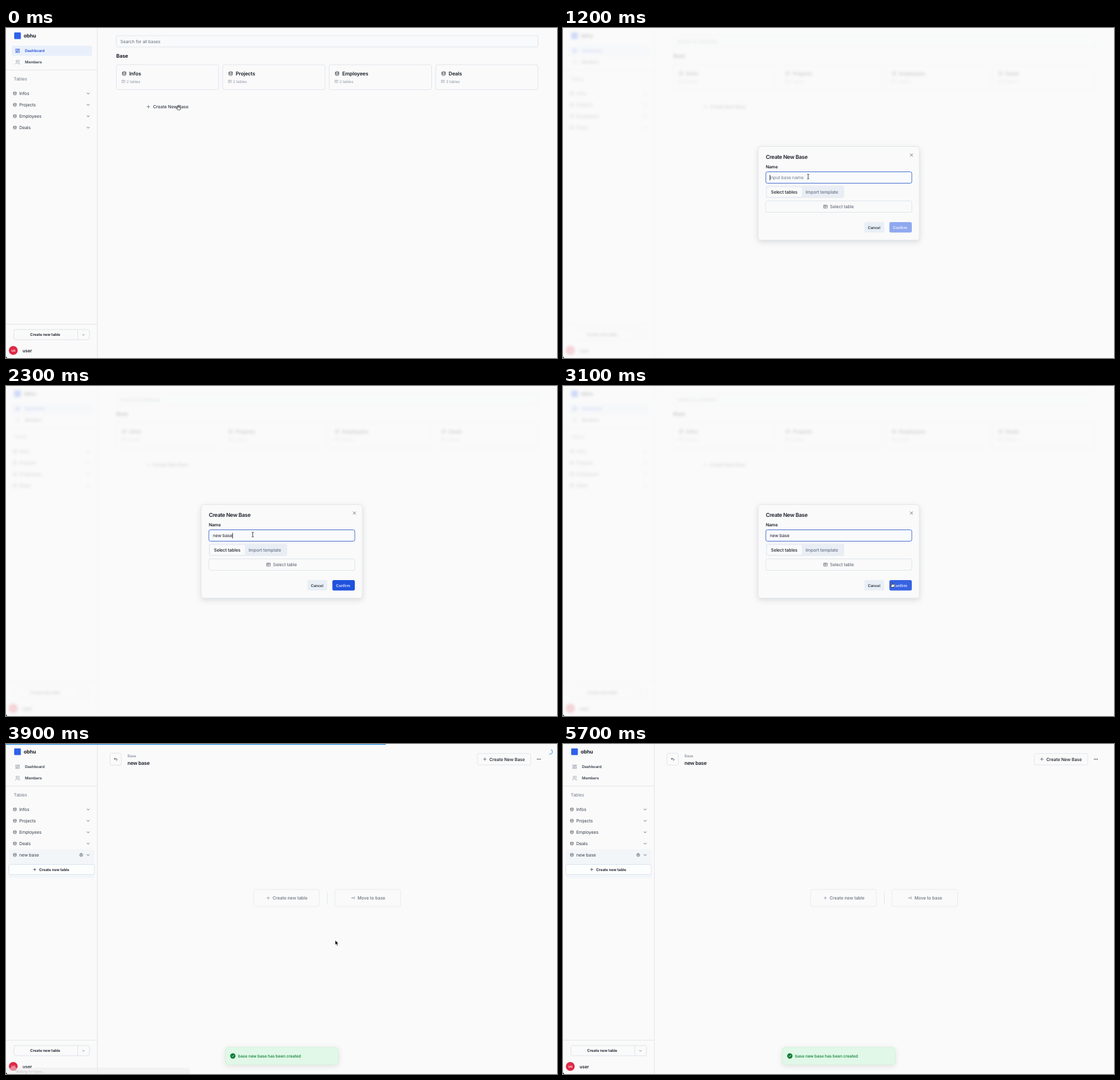
An HTML page that plays this animation: 872 by 522 pixels, repeating every 5.9 s.

```html
<!DOCTYPE html>
<html lang="en">
<head>
<meta charset="utf-8">
<title>Create a base</title>
<style>
  html, body { margin: 0; width: 100%; height: 100%; overflow: hidden; background: #fafafa; }
  svg { display: block; width: 872px; height: 522px; }
  text {
    font-family: Inter, "Open Sans", sans-serif;
    letter-spacing: -.015em;
    text-rendering: geometricPrecision;
    white-space: pre;
  }
  .tight { letter-spacing: -.035em; }
  #dialog { transform-origin: 436.5px 261.5px; }
  #panel { filter: drop-shadow(0 3px 4px rgba(15, 23, 42, .13)); }
  #toastBox { filter: drop-shadow(0 2px 4px rgba(0, 0, 0, .11)); }
</style>
</head>
<body>
<svg id="stage" viewBox="0 0 872 522"></svg>
<script>
const LOOP = 5900, STEP = 100;
const INK = '#1b1f2a', SOFT = '#353d4b', MUTED = '#727b8a', PALE = '#8f97a5';
const LINE = '#e1e6ed', BG = '#fafafa', BLUE = '#2450d8', GREEN = '#0a7d33';

const ICONS = {
  base: 'M4 6c0-1.7 3.6-3 8-3s8 1.3 8 3-3.6 3-8 3-8-1.3-8-3v12c0 1.7 3.6 3 8 3s8-1.3 8-3V6M4 12c0 1.7 3.6 3 8 3s8-1.3 8-3',
  down: 'm5 9 7 7 7-7',
  plus: 'M4 12h16M12 4v16',
  close: 'M19 5 5 19M5 5l14 14',
  table: 'M3 4h18v16H3zM3 10h18M10 4v16',
  dash: 'M4 4h6v8H4zM4 16h6v4H4zM14 12h6v8h-6zM14 4h6v4h-6z',
  users: 'M5 7a4 4 0 1 0 8 0 4 4 0 1 0-8 0M3 21v-2a4 4 0 0 1 4-4h4a4 4 0 0 1 4 4v2M16 3a4 4 0 0 1 0 8M21 21v-2a4 4 0 0 0-3-4',
  back: 'm9 14-4-4 4-4M5 10h11a4 4 0 1 1 0 8h-1',
  move: 'M3 12h12M11 8l4 4-4 4M20 5v14',
  ring: 'M12 3a9 9 0 1 0 0 18 9 9 0 1 0 0-18M12 8a4 4 0 1 0 0 8 4 4 0 1 0 0-8',
  check: 'm7 12 4 4 7-8'
};

// y is the middle of the capitals
const label = (x, y, str, size = 7, weight = 400, fill = INK, extra = '') =>
  `<text x="${x}" y="${y + size * .364}" font-size="${size}" font-weight="${weight}" fill="${fill}" ${extra}>${str}</text>`;
const rect = (x, y, w, h, fill = 'none', stroke = 'none', r = 3, extra = '') =>
  `<rect x="${x}" y="${y}" width="${w}" height="${h}" rx="${r}" fill="${fill}" stroke="${stroke}" ${extra}/>`;
const line = (x1, y1, x2, y2, color = '#e4e6eb') =>
  `<path d="M${x1} ${y1}L${x2} ${y2}" stroke="${color}"/>`;
const icon = (name, cx, cy, size, color = SOFT, width = 2) =>
  `<path d="${ICONS[name]}" transform="translate(${cx - size / 2} ${cy - size / 2}) scale(${size / 24})"
    fill="none" stroke="${color}" stroke-width="${width}" stroke-linecap="round" stroke-linejoin="round"/>`;
const group = (id, ...parts) => `<g id="${id}">${parts.join('')}</g>`;

const navRow = (y, name, glyph, color, tint) =>
  icon(glyph, 18.5, y, 8.4, tint) + label(30, y, name, 6, 600, color);
const sideRow = (y, name) =>
  icon('base', 14, y, 6.6, SOFT) + label(21, y, name, 7, 400, SOFT) + icon('down', 130, y, 6, INK, 2.6);
const card = (x, y, name, count) =>
  rect(x, y, 162, 39.5, BG, LINE) +
  icon('base', x + 12.5, y + 14, 8, INK) + label(x + 20.5, y + 14, name, 8, 600) +
  icon('table', x + 11.5, y + 26.5, 6, PALE, 1.8) + label(x + 16.3, y + 26.5, `${count} tables`, 6, 400, PALE);

const sidebar = group('sidebar',
  rect(13, 7, 10.5, 10.5, '#2f62ea', 'none', 1),
  label(28, 12, 'obhu', 8, 700),
  group('activeNav', rect(9, 28, 127, 16, '#e9f0fb', 'none', 2), navRow(36, 'Dashboard', 'dash', BLUE, BLUE)),
  group('idleNav', navRow(36, 'Dashboard', 'dash', SOFT, PALE)),
  navRow(54, 'Members', 'users', SOFT, PALE),
  line(0, 66.5, 144, 66.5), line(144.5, 0, 144.5, 522),
  label(12.3, 80, 'Tables', 7, 400, MUTED),
  group('openRow',
    rect(4.5, 166.5, 135.5, 45.5, '#f3f6f9', 'none', 2),
    rect(4.5, 190.5, 135.5, 16, '#fcfdfd', '#dbe4ee', 2),
    icon('plus', 45.5, 198.5, 6, INK, 2.4), label(52.5, 198.5, 'Create new table', 6, 600),
    icon('ring', 119, 175.5, 6.6, SOFT)),
  ['Infos', 'Projects', 'Employees', 'Deals'].map((n, i) => sideRow(103.5 + 18 * i, n)).join(''),
  group('newRow', sideRow(175.5, 'new base')),
  line(0, 468.5, 144, 468.5),
  rect(12.5, 477, 119.5, 16, BG, '#dfe4eb', 2.5), line(113.5, 477, 113.5, 493, '#dfe4eb'),
  label(38.3, 485, 'Create new table', 6, 600), icon('down', 122.5, 485.3, 5, INK, 2.4),
  '<circle cx="11.5" cy="510" r="7" fill="#dd2a45"/>',
  label(11.5, 510, 'us', 6, 500, '#fff', 'text-anchor="middle"'),
  label(26.3, 510, 'user', 7, 600));

const dashboard = group('dashboard',
  rect(174.5, 12, 667.5, 18, '#f8fafb', LINE, 2),
  label(181, 21, 'Search for all bases', 7, 400, '#67707e'),
  label(174.5, 44, 'Base', 8, 700),
  card(174.5, 58, 'Infos', 2), card(343, 58, 'Projects', 2),
  card(511.5, 58, 'Employees', 2), card(680, 58, 'Deals', 3),
  group('newCard',
    card(174.5, 104, 'new base', 0),
    rect(343, 104.5, 162, 40, 'none', '#e8ecf1', 3, 'stroke-dasharray="2 1"')),
  group('createLabel',
    icon('plus', 225.4, 124.5, 6.6, SOFT), label(232.8, 124.5, 'Create New Base', 7, 500, SOFT)));

const basePage = group('basePage',
  rect(164.5, 14.5, 18, 19, BG, '#e2e6ec', 2.5), icon('back', 173.5, 24, 7, INK, 2.2),
  label(192.3, 18.7, 'Base', 6, 400, MUTED),
  label(192.3, 30, 'new base', 8, 600, INK, 'class="tight"'),
  rect(746, 15, 84.5, 18, BG, '#e2e6ec', 2.5),
  icon('plus', 757.8, 24, 6.6, INK), label(765, 24, 'Create New Base', 7, 500),
  [841, 843.3, 845.6].map(x => `<circle cx="${x}" cy="24" r=".75" fill="${INK}"/>`).join(''),
  rect(392, 230, 104, 27, BG, '#e8ebf0', 3), rect(520.5, 230, 104, 27, BG, '#e8ebf0', 3),
  line(508.5, 235, 508.5, 253, '#e4e7ec'),
  icon('plus', 415, 243.5, 6.6, MUTED), label(422, 243.5, 'Create new table', 7, 500, '#6c7583'),
  icon('move', 549, 243.5, 7, MUTED), label(556.3, 243.5, 'Move to base', 7, 500, '#6c7583'));

const dialog = group('dialog',
  rect(309, 187.5, 255, 148, BG, '#e4e7ec', 4, 'id="panel"'),
  label(321, 204, 'Create New Base', 8.5, 600, INK, 'class="tight"'),
  icon('close', 551.5, 201, 7, SOFT, 2.2),
  label(321, 220, 'Name', 6.8, 600),
  rect(321, 227.5, 231, 18, '#f8fafc', '#4f74d2', 2.5),
  label(327.3, 236.7, '', 7, 400, INK, 'id="typed"'),
  rect(327, 232.5, .8, 8.5, '#111', 'none', 0, 'id="caret"'),
  rect(321, 249.5, 124, 19.5, '#e9eef5', 'none', 3), rect(323, 251.5, 55, 15.5, BG, 'none', 2),
  label(329, 259.5, 'Select tables', 7, 500), label(384, 259.5, 'Import template', 7, 500, '#6a7587'),
  rect(321, 273.5, 231, 18, BG, LINE, 2.5),
  icon('table', 415.5, 282.5, 7, SOFT, 1.8), label(422.6, 282.5, 'Select table', 7, 400, '#525b69'),
  rect(477, 307, 31.5, 16.5, '#e9eff6', 'none', 2.5), label(482.6, 315.5, 'Cancel', 6, 500),
  rect(516.5, 307, 35.5, 16.5, BLUE, 'none', 2.5, 'id="confirm"'),
  label(522.2, 315.5, 'Confirm', 6, 500, '#fff'));

const toast = group('toast',
  rect(347.5, 480, 178, 27, '#e1f8e8', '#d5f3de', 4, 'id="toastBox"'),
  `<circle cx="359" cy="493.5" r="4.2" fill="${GREEN}"/>`, icon('check', 358.9, 493.5, 7, '#fff', 2.6),
  label(367.3, 493.5, 'base new base has been created', 6.5, 500, GREEN));

const loader = group('loader',
  rect(0, 0, 0, 1.2, '#2b8fe6', 'none', 0, 'id="bar"'),
  '<path id="spinner" d="M0-3.7A3.7 3.7 0 0 1 0 3.7" fill="none" stroke="#2b8fe6"/>');

const statusBar = group('statusBar',
  rect(-3, 512, 294, 13, '#ececee', 'none', 2), label(15, 517.5, 'Waiting for base...', 5.6, 400, '#8e8e93'));

const pointer = group('pointer',
  '<path id="arrow" d="M0 0v7.4l1.7-1.6 1.3 2.9 1.3-.6-1.3-2.8h2.4z" fill="#000" stroke="#fff" stroke-width=".6"/>',
  '<path id="hand" transform="translate(-3.8 -4.2) scale(.36)" fill="#fff" stroke="#111" stroke-width="2" d="M22 14a8 8 0 0 1-8 8h-2.6c-2 0-3.5-.8-4.8-2.2L3 16a2 2 0 0 1 3-3l2 2V4a2 2 0 0 1 4 0v6a2 2 0 0 1 3 0 2 2 0 0 1 3.5 1 2 2 0 0 1 3.5 1z"/>',
  '<path id="beam" d="M-1.6-3.8Q0-3.8 0-2.8Q0-3.8 1.6-3.8M0-2.8V2.8M-1.6 3.8Q0 3.8 0 2.8Q0 3.8 1.6 3.8" fill="none" stroke="#222" stroke-width=".8"/>');

const stage = document.getElementById('stage');
stage.innerHTML = group('page', sidebar, dashboard, basePage) +
  rect(0, 0, 872, 522, BG, 'none', 0, 'id="veil"') +
  dialog + toast + loader + statusBar + pointer + '<path d="M0 518.5Q.3 521.7 3 522H0z" fill="#000"/>';

const el = {};
stage.querySelectorAll('[id]').forEach(node => el[node.id] = node);

const show = (id, on) => el[id].style.display = on ? '' : 'none';
const fade = (id, a) => { el[id].style.opacity = a; show(id, a > 0); };
const ramp = (t, a, b) => Math.min(1, Math.max(0, (t - a) / (b - a)));
const easeOut = p => 1 - (1 - p) ** 2;
const easeBoth = p => p * p * (3 - 2 * p);

// [time, value, ...] rows, eased between neighbours
function track(keys, t) {
  let i = 0;
  while (i < keys.length - 2 && t >= keys[i + 1][0]) i++;
  const [a, b] = [keys[i], keys[i + 1]], p = easeBoth(ramp(t, a[0], b[0]));
  return a.slice(1).map((v, k) => v + (b[k + 1] - v) * p);
}

const PATH = [[300, 272.5, 126], [800, 387, 237], [1000, 388, 235], [2200, 388, 235],
  [2300, 390.5, 235], [2900, 521, 314.5], [3100, 521, 314.5]];
const BAR = [[3300, 0], [3500, 139], [3800, 330], [4000, 872]];
const NAME = 'new base';
const KEYS = [1400, 1500, 1600, 1800, 1900, 2000, 2100, 2200];

function drawDialog(t) {
  const open = easeOut(ramp(t, 100, 400)) * (1 - ramp(t, 3150, 3380));
  fade('dialog', open);
  el.dialog.style.transform = `scale(${.95 + .05 * open})`;
  fade('veil', open * .79);
  el.page.style.filter = open > 0 ? `blur(${2 * open}px)` : 'none';

  const count = KEYS.filter(k => t >= k).length;
  el.typed.textContent = count ? NAME.slice(0, count) : 'Input base name';
  el.typed.setAttribute('fill', count ? INK : '#727c8b');
  const since = t - (count ? KEYS[count - 1] : 100);
  show('caret', since >= 0 && since % 1000 < 500);
  let end = 327;
  if (count && open > 0) {
    end = 327.3 + el.typed.getComputedTextLength();
  }
  el.caret.setAttribute('x', end);
  return { open, count };
}

function drawPointer(t, open, count) {
  const [x, y] = track(PATH, t);
  const onConfirm = open > .5 && x > 516.5 && y > 307;
  const onInput = open > .5 && x > 321 && y > 227 && y < 246;
  const shape = onConfirm || t < 300 ? 'hand' : onInput ? 'beam' : 'arrow';
  for (const s of ['arrow', 'hand', 'beam']) show(s, s === shape);
  const lift = shape === 'arrow' ? 4 : 0;
  el.pointer.setAttribute('transform', `translate(${x} ${y - lift})`);
  fade('pointer', 1 - ramp(t, 5000, 5300));
  el.confirm.setAttribute('fill', !count ? '#8fa8ef' : onConfirm ? '#3762e2' : '#1f52dd');
}

function draw(t) {
  const created = t >= 3300, inside = t >= 3800;
  show('dashboard', !inside);
  show('basePage', inside);
  show('activeNav', !inside);
  show('idleNav', inside);
  show('openRow', inside);
  show('newRow', created);
  show('newCard', created);
  el.createLabel.setAttribute('transform', `translate(${created ? 168.4 : 0} 0)`);

  const { open, count } = drawDialog(t);
  drawPointer(t, open, count);

  const rise = easeOut(ramp(t, 3180, 3580));
  fade('toast', rise);
  el.toast.setAttribute('transform', `translate(0 ${27 * (1 - rise)})`);

  fade('loader', t < 3400 ? 0 : 1 - ramp(t, 4000, 4200));
  el.bar.setAttribute('width', track(BAR, t)[0]);
  el.spinner.setAttribute('transform', `translate(861 12.3) rotate(${25 + (t - 3500) * .9})`);
  fade('statusBar', t < 3800 ? 0 : .5 * (1 - ramp(t, 4000, 4400)));
}

const start = performance.now();
function tick() {
  const t = (performance.now() - start) % LOOP;
  draw(Math.floor(t / STEP) * STEP);
  requestAnimationFrame(tick);
}
tick();
</script>
</body>
</html>
```
